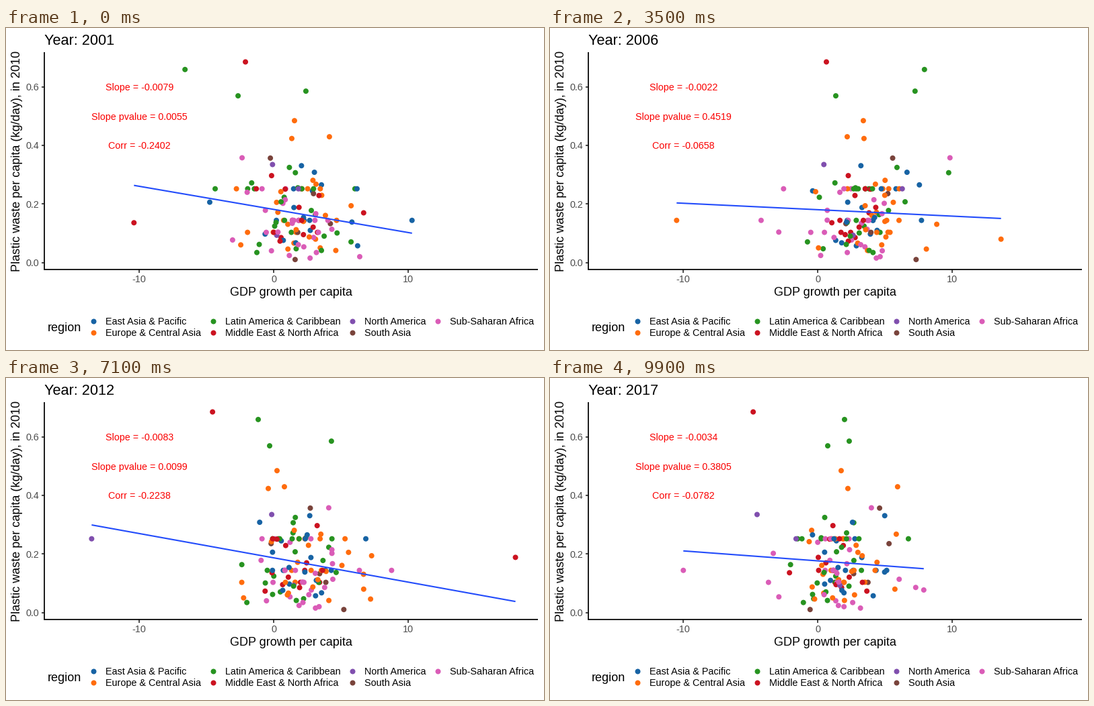
A matplotlib script for the animation above (10000 ms loop, 800 px wide and 480 px high).

```python
from math import erfc, sqrt

import numpy as np
import matplotlib.pyplot as plt
from matplotlib.animation import FuncAnimation

plt.rcParams["font.family"] = "Liberation Sans"
PT = 0.72  # points per pixel at 100 dpi
FRAMES = 100
rng = np.random.default_rng(12)

# name, colour, countries, lowest and highest waste, growth lift, cycle strength
REGIONS = [
    ("East Asia & Pacific", "#1763a4", 19, .057, .331, .8, .7),
    ("Europe & Central Asia", "#ff6c0c", 28, .041, .281, .6, 1.4),
    ("Latin America & Caribbean", "#279320", 25, .034, .325, 0, .9),
    ("Middle East & North Africa", "#cb1220", 15, .073, .297, -.2, .8),
    ("North America", "#804fae", 3, .093, .335, -.8, 1),
    ("South Asia", "#79433b", 5, .010, .357, 1.8, .4),
    ("Sub-Saharan Africa", "#da5cb7", 27, .015, .240, .3, .3),
]
COLORS = [r[1] for r in REGIONS]
COMMON = [.103, .144, .144, .252]  # levels many countries share

# Key years: mean growth, line ends, slope, correlation, p-value
KEYS = {
    2001: (1.1, -10.4, 10.3, -.0079, -.2402, .0055),
    2004: (3.3, -5.0, 12.95, -.0017, -.0439, .6182),
    2007: (3.5, -10.5, 13.65, -.0022, -.0658, .4519),
    2009: (-2.5, -14.9, 9.85, -.0080, -.3236, .0001),
    2012: (1.7, -13.55, 18.0, -.0083, -.2238, .0099),
    2015: (.9, -12.65, 9.45, -.0025, -.0648, .4636),
    2017: (1.1, -10.0, 7.9, -.0034, -.0782, .3805),
}
# The tallest dots: region, waste, growth in the key years
TALL = [
    (3, .686, -2.1, 8.8, .65, -12.55, -4.55, -3.3, -4.8),
    (2, .660, -6.6, 4.6, 7.95, -13.1, -1.15, 2.95, 2.0),
    (2, .586, 2.4, 1.6, 7.25, 3.65, 4.3, 2.5, 2.35),
    (2, .570, -2.65, 1.1, 1.35, -4.35, -.3, .6, .75),
    (1, .485, 1.55, 1.2, 3.4, -5.35, .25, .85, 1.75),
    (1, .430, 4.15, 4.75, 2.2, -5.6, .8, np.nan, 5.95),
    (1, .424, 1.35, 1.7, 3.45, -4.25, -.4, 1.5, 2.25),
    (6, .358, -2.35, -2.5, 9.85, -1.5, 4.1, 2.6, 4.0),
]


def px(growth):
    return 398 + 19.975 * growth


def py(waste):
    return 349.5 - 435.8 * waste


def year_stats(year):
    """Key values, or a seeded blend of the neighbouring key years."""
    if year in KEYS:
        return KEYS[year]
    mean, lo, hi, slope, corr, _ = (np.interp(year, list(KEYS), col)
                                    for col in zip(*KEYS.values()))
    lo, hi = lo + rng.normal(0, 2), hi + rng.normal(0, 2)
    p = erfc(abs(corr) * sqrt(64 / (1 - corr ** 2)))
    return mean, lo, hi, round(slope, 4), round(corr, 4), round(p, 4)


STATS = [year_stats(y) for y in range(2001, 2018)]

# Crowd: each region's waste runs evenly from low to high, denser near the
# bottom, with every third country moved to one of the common levels.
kind, waste = [], []
for r, (_, _, count, low, high, _, _) in enumerate(REGIONS):
    levels = low + (high - low) * np.linspace(0, 1, count) ** 1.5
    levels[1:-1:3] = rng.choice(COMMON, len(levels[1:-1:3]))
    kind += [r] * count
    waste += list(levels)
order = rng.permutation(len(kind))
kind, waste = np.array(kind)[order], np.array(waste)[order]
lift = np.array([r[5] for r in REGIONS])[kind]
cycle = np.array([r[6] for r in REGIONS])[kind]
steady = rng.normal(0, .8, len(kind))


def growth(year, stats):
    """Growth of all countries; the crowd spans the ends of the line."""
    mean, lo, hi = stats[:3]
    noise = rng.laplace(0, 1.5, len(kind))
    crowd = 1.5 + lift + cycle * (mean - 1.5) + steady + noise
    crowd = np.where((crowd > lo) & (crowd < hi), crowd, mean + steady)
    crowd[crowd.argmin()], crowd[crowd.argmax()] = lo, hi
    tall = [np.interp(year, list(KEYS), t[2:]) for t in TALL]
    return np.append(crowd, tall)


points = [px(growth(2001 + k, s)) for k, s in enumerate(STATS)]
heights = py(np.append(waste, [t[1] for t in TALL]))
dot_colors = [COLORS[r] for r in kind] + [COLORS[t[0]] for t in TALL]

fig = plt.figure(figsize=(8, 4.8), dpi=100, facecolor="white")
ax = fig.add_axes([0, 0, 1, 1])
ax.set(xlim=(0, 800), ylim=(480, 0))
ax.axis("off")


def label(x, y, text, size, color="black", ha="left", **kw):
    return ax.text(x, y, text, fontsize=size * PT, color=color, ha=ha,
                   va="baseline", **kw)


def stroke(x, y, color="black", width=1.75, **kw):
    return ax.plot(x, y, color=color, lw=width * PT,
                   solid_capstyle="butt", **kw)[0]


def dots(x, y, color):
    return ax.scatter(x, y, s=(8 * PT) ** 2, c=color, linewidths=0, zorder=3)


for v in (-10, 0, 10):
    stroke([px(v)] * 2, [360, 364.5], "#333333")
    label(px(v), 379, str(v), 14.4, "#4d4d4d", "center")
for v in (0, .2, .4, .6):
    stroke([52.5, 57], [py(v)] * 2, "#333333")
    label(49, py(v) + 5.2, f"{v:.1f}", 14.4, "#4d4d4d", "right")
stroke([57, 57, 791], [36, 360, 360], solid_joinstyle="miter")
label(424, 399, "GDP growth per capita", 18, ha="center")
label(21, 198, "Plastic waste per capita (kg/day), in 2010", 18, ha="center",
      rotation=90, rotation_mode="anchor")

label(62, 451.5, "region", 18)
for k, (name, color, *_) in enumerate(REGIONS):
    x, y = (130, 308, 515, 642)[k // 2], (436.5, 454)[k % 2]
    dots([x], [y], color)
    label(x + 17.6, y + 5.2, name, 14.4)

title = label(57, 25, "", 21.6)
notes = [label(px(-10), py(v) + 5.3, "", 14.2, "#fa0000", "center")
         for v in (.6, .5, .4)]
cloud = dots(points[0], heights, dot_colors)
trend = stroke([], [], "#234cfb", 2.1, zorder=4)


def draw(i):
    k = (2 * i + 5) * 8 // (FRAMES - 1)  # data runs slightly ahead of the title
    mean, lo, hi, slope, corr, p = STATS[k]
    ends = np.array([lo, hi])
    cloud.set_offsets(np.column_stack([points[k], heights]))
    trend.set_data(px(ends), py(.1728 + slope * (ends - mean)))
    title.set_text(f"Year: {2001 + 16 * i // (FRAMES - 1)}")
    notes[0].set_text(f"Slope = {slope}")
    notes[1].set_text(f"Slope pvalue = {p}")
    notes[2].set_text(f"Corr = {corr}")
    return cloud, trend, title, *notes


anim = FuncAnimation(fig, draw, frames=FRAMES, interval=100, repeat=True,
                     repeat_delay=0, blit=False)
plt.show()
```
